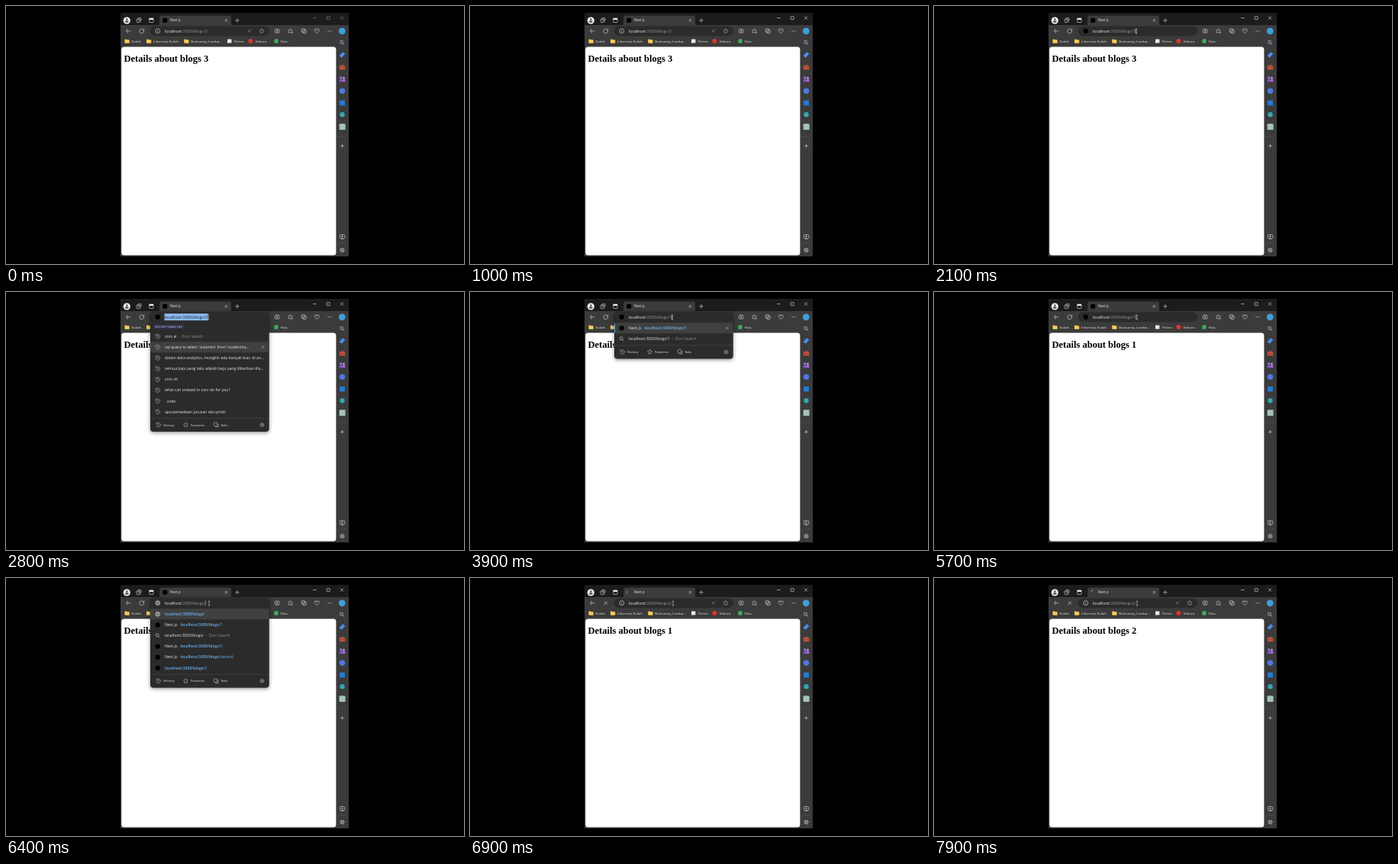
These frames come from a looping animation (600 px wide and 338 px high, 8000 ms). An HTML page with a canvas:

```html
<!DOCTYPE html>
<html lang="en">
<head>
<meta charset="utf-8">
<title>Blog details</title>
<style>
html, body { margin: 0; width: 100%; height: 100%; overflow: hidden; background: #000; }
canvas { display: block; width: 600px; height: 338px; }
</style>
</head>
<body>
<canvas id="stage"></canvas>
<script>
const LOOP = 8000;
const canvas = document.getElementById('stage');
const ctx = canvas.getContext('2d');
const dpr = window.devicePixelRatio || 1;
canvas.width = 600 * dpr;
canvas.height = 338 * dpr;

const UI = '"Open Sans", "Noto Sans", sans-serif';
const BAR = '#3b3b3b', FIELD = '#2b2b2b', ICON = '#c8c8c8', LINK = '#6cb2f2';
const BASE = 'localhost:3000/blogs/';

// Drawing helpers
function box(x, y, w, h, color, r = 0) {
  ctx.fillStyle = color;
  ctx.beginPath();
  ctx.roundRect(x, y, w, h, r);
  ctx.fill();
}
function frame(x, y, w, h, color = ICON, r = 1, lw = 0.7) {
  ctx.strokeStyle = color;
  ctx.lineWidth = lw;
  ctx.beginPath();
  ctx.roundRect(x, y, w, h, r);
  ctx.stroke();
}
function dot(x, y, r, color) {
  ctx.fillStyle = color;
  ctx.beginPath();
  ctx.arc(x, y, r, 0, Math.PI * 2);
  ctx.fill();
}
function arc(x, y, r, color = ICON, from = 0, to = Math.PI * 2, lw = 0.7) {
  ctx.strokeStyle = color;
  ctx.lineWidth = lw;
  ctx.beginPath();
  ctx.arc(x, y, r, from, to);
  ctx.stroke();
}
function line(points, color = ICON, lw = 0.7) {
  ctx.strokeStyle = color;
  ctx.lineWidth = lw;
  ctx.beginPath();
  for (let i = 0; i < points.length; i += 2) ctx.lineTo(points[i], points[i + 1]);
  ctx.stroke();
}
// Writes text centred on y and returns the x where it ends.
function label(text, x, y, size, color = '#e6e6e6', weight = 400) {
  ctx.font = `${weight} ${size}px ${UI}`;
  ctx.fillStyle = color;
  ctx.fillText(text, x, y + size * 0.35);
  return x + ctx.measureText(text).width;
}

// Icons
function cross(x, y, r, color = ICON) {
  line([x - r, y - r, x + r, y + r], color);
  line([x - r, y + r, x + r, y - r], color);
}
function plus(x, y, r) {
  line([x - r, y, x + r, y]);
  line([x, y - r, x, y + r]);
}
function star(x, y, r, color = ICON) {
  ctx.strokeStyle = color;
  ctx.lineWidth = 0.6;
  ctx.beginPath();
  for (let i = 0; i < 10; i++) {
    const a = -Math.PI / 2 + i * Math.PI / 5, d = i % 2 ? r * 0.5 : r;
    ctx.lineTo(x + d * Math.cos(a), y + d * Math.sin(a));
  }
  ctx.closePath();
  ctx.stroke();
}
function gear(x, y, r, color = ICON) {
  arc(x, y, r * 0.85, color);
  arc(x, y, r * 0.35, color);
  for (let i = 0; i < 6; i++) {
    const c = Math.cos(i * Math.PI / 3), s = Math.sin(i * Math.PI / 3);
    line([x + c * r * 0.8, y + s * r * 0.8, x + c * r * 1.15, y + s * r * 1.15], color);
  }
}
function search(x, y, color = ICON, lw = 0.7) {
  arc(x - 0.7, y - 0.7, 2, color, 0, 7, lw);
  line([x + 0.8, y + 0.8, x + 2.8, y + 2.8], color, lw);
}
function clock(x, y) {
  arc(x, y, 2.8, '#a8a8a8', -2.6, 3);
  line([x - 2.9, y - 2.8, x - 2.7, y - 1, x - 1, y - 1], '#a8a8a8', 0.6);
  line([x, y - 1.6, x, y + 0.2, x + 1.3, y + 0.2], '#a8a8a8', 0.6);
}
function globe(x, y) {
  arc(x, y, 2.9, ICON);
  ctx.beginPath();
  ctx.ellipse(x, y, 1.3, 2.9, 0, 0, 7);
  ctx.stroke();
  line([x - 2.8, y - 1, x + 2.8, y - 1], ICON, 0.5);
  line([x - 2.8, y + 1, x + 2.8, y + 1], ICON, 0.5);
}
function info(x, y) {
  arc(x, y, 3, ICON);
  line([x, y - 0.4, x, y + 1.7], ICON, 0.8);
  dot(x, y - 1.5, 0.45, ICON);
}
function site(x, y) { dot(x, y, 3.2, '#000'); }
function folder(x, y) {
  box(x - 3, y - 2.5, 3, 2, '#e2a52e', 0.5);
  box(x - 3, y - 1.8, 6.2, 4.5, '#f8cc57', 0.6);
}
const rowIcons = { clock, globe, search, site };

// Suggestion rows: icon name followed by [text, style] pieces
const STYLES = {
  plain: ['#e6e6e6', 400], dim: ['#8f8f8f', 400], link: [LINK, 400], bold: [LINK, 600]
};
const recent = [
  'zorv ai', "sql query to select 'sulambo' from 'studentna...",
  'dalam data analytics, mungkin ada banyak bias. di an...',
  'semua baju yang laku adalah baju yang diberikan dis...',
  'zorv ch', 'what can ordavel in zorv do for you?', '. code',
  'apa perbedaan jurusan dan prodi'
].map(text => ['clock', [text, 'plain']]);
recent[0].push(['  -  Zorv Search', 'dim']);

const titled = (...rest) => ['site', ['Next.js', 'plain'], [' - ', 'dim'], ...rest];
const searchRow = text => ['search', [text, 'plain'], ['  -  Zorv Search', 'dim']];
const prefixRows = [
  ['globe', [BASE, 'bold']],
  titled([BASE, 'bold'], ['1', 'link']),
  searchRow(BASE),
  titled([BASE, 'bold'], ['3', 'link']),
  titled([BASE, 'bold'], ['second', 'link']),
  ['site', [BASE, 'bold'], ['2', 'link']]
];
const exactRows = id => [
  id === '1' ? titled([BASE + id, 'bold']) : ['site', [BASE + id, 'bold']],
  searchRow(BASE + id)
];

// Each step overrides the state from its time onward.
const steps = [
  [0, { id: '3', page: '3', active: false, focus: false, list: '', selected: false, loading: false, hover: -1 }],
  [500, { active: true }],
  [2000, { focus: true }],
  [2300, { list: 'recent', selected: true, hover: 1 }],
  [3300, { selected: false }],
  [3700, { id: '', list: 'prefix', hover: 0 }],
  [3900, { id: '1', list: 'exact' }],
  [4200, { focus: false, list: '', loading: true }],
  [4600, { page: '1' }],
  [5500, { loading: false }],
  [5700, { focus: true }],
  [5800, { list: 'recent', selected: true, hover: -1 }],
  [6300, { id: '', list: 'prefix', selected: false, hover: 0 }],
  [6600, { id: '2', list: 'exact' }],
  [6900, { focus: false, list: '', loading: true }],
  [7300, { page: '2' }]
];
const stateAt = t => Object.assign({}, ...steps.filter(s => s[0] <= t).map(s => s[1]));

function drawTitleBar(s, t) {
  box(150, 9, 299, 319, '#1c1c1c', 1);
  dot(158.3, 19, 4.6, '#f4f4f4');
  dot(158.3, 17.6, 1.3, '#555');
  box(156, 19.3, 4.6, 2.4, '#555', 1.2);
  frame(171, 17, 5, 4.5);
  frame(173, 15.5, 4, 3.5);
  frame(187.7, 16, 5.4, 5.5);
  box(187.7, 16, 5.4, 2, '#f0f0f0');
  box(201, 12.5, 94, 14, BAR, [3, 3, 0, 0]);
  if (s.loading) {
    const a = Math.PI + ((t - 5200) / 900) * Math.PI * 2;
    arc(208.3, 18.8, 2.9, '#4aa3e8', a, a + 1.6, 1);
  } else site(208.3, 18.8);
  label('Next.js', 215, 18.9, 4.4);
  cross(288.5, 18.8, 1.7);
  plus(303, 18.8, 2.6);
  const control = s.active ? '#d0d0d0' : '#777';
  line([402, 15.7, 406.5, 15.7], control);
  frame(420.2, 13.7, 4, 4, control, 0.5);
  cross(440, 15.6, 2, control);
}

function drawToolbar(s) {
  box(150, 25, 299, 303, BAR);
  line([163.4, 32.8, 157.2, 32.8]);
  line([160, 30, 157.2, 32.8, 160, 35.6]);
  if (s.loading) cross(177.8, 32.8, 2.2);
  else {
    arc(177.8, 32.8, 2.9, ICON, -0.3, 5.2);
    line([180.6, 29.5, 180.6, 31.7, 178.5, 31.7]);
  }
  box(188.5, 26.5, 156.5, 12.7, FIELD, 6.3);

  frame(352.5, 30.2, 2.7, 5.2);
  frame(355.2, 30.2, 2.7, 5.2);
  star(372.3, 32.8, 3.2);
  line([374, 35, 376, 35]);
  frame(387.3, 29.7, 4.3, 4.5);
  frame(389, 31.2, 4.3, 4.5);
  arc(405.7, 31.7, 1.6, ICON, 2.6, 6.2);
  arc(408.7, 31.7, 1.6, ICON, 3.2, 6.8);
  line([404.3, 32.6, 407.2, 35.6, 410.1, 32.6]);
  for (let i = -1; i < 2; i++) dot(424 + i * 2, 32.8, 0.6, ICON);
  dot(440.3, 32.8, 4.4, '#3d9fda');
}

function drawBookmarks() {
  const marks = [[158.5, 'Kuliah'], [187, 'Informasi Kuliah'], [236.3, 'Bootcamp, Lomba...']];
  for (const [x, name] of marks) {
    folder(x, 46);
    label(name, x + 6, 46, 4.35);
  }
  box(290, 43.5, 5.4, 5, '#e8e8e8', 0.5);
  label('Pelmo', 299, 46, 4.35);
  dot(320.3, 46, 3, '#e3322b');
  label('Vidorra', 326.5, 46, 4.35);
  dot(354, 46, 2.9, '#43a85a');
  label('Rutu', 360, 46, 4.35);
}

function drawSidebar() {
  search(440.3, 48, '#9db7d8', 0.9);
  ctx.save();
  ctx.translate(440.5, 64);
  ctx.rotate(-Math.PI / 4);
  box(-3.5, -2.1, 7, 4.2, '#4a8fe8', 1);
  ctx.restore();
  frame(438.8, 77, 3.4, 3, '#b95a40');
  box(436.8, 78.3, 7.5, 5, '#c7563c', 0.8);
  line([436.8, 80.8, 444.3, 80.8], '#7e3024', 0.6);
  dot(438.8, 93.9, 1.6, '#9a78e0');
  box(436.8, 95.7, 4.3, 3.7, '#7d55c8', 1);
  dot(442.5, 94.2, 1.5, '#c393e6');
  box(441, 95.9, 3.4, 3.3, '#b26bd2', 1);
  dot(440.5, 111.3, 3.7, '#5179dc');
  box(437, 123.8, 7, 6.8, '#2479cf', 1);
  dot(440.5, 142.3, 3.2, '#35a6b5');
  box(436.6, 154.3, 8, 8, '#a3c4b8', 1.2);
  line([436, 171, 446, 171], '#606060', 0.5);
  plus(440.5, 183.3, 2.4);
  frame(437.4, 299.5, 6.3, 4.8);
  plus(440.5, 301.8, 1.3);
  line([438.8, 305.2, 442.2, 305.2]);
  line([436, 311, 446, 311], '#606060', 0.5);
  gear(440.5, 319.8, 2.8);
}

function drawPage(s) {
  box(151.2, 53.4, 281.2, 273.2, '#fff', 3.5);
  ctx.font = 'bold 12.5px "Liberation Serif", "Times New Roman", serif';
  ctx.fillStyle = '#000';
  ctx.fillText('Details about blogs ' + s.page, 154.5, 73.3);
}

function drawSuggestions(s) {
  const rows = s.list === 'recent' ? recent : s.list === 'prefix' ? prefixRows : exactRows(s.id);
  const first = s.list === 'recent' ? 58.2 : 47.3;
  const rowY = i => first + i * 14.1;
  const rule = rowY(rows.length - 1) + 8.5;
  const foot = rule + 8.6;

  ctx.save();
  ctx.shadowColor = 'rgba(0,0,0,.45)';
  ctx.shadowBlur = 5 * dpr;
  ctx.shadowOffsetY = 1.5 * dpr;
  box(189, 25.7, 155.7, rule + 17.5 - 25.7, FIELD, 4);
  ctx.restore();

  if (s.list === 'recent') {
    box(193.5, 42, 40.5, 7.3, '#2d2f42');
    label('RECENT SEARCHES', 195, 45.7, 4.15, '#c3c8ef');
  }
  rows.forEach(([icon, ...pieces], i) => {
    const y = rowY(i);
    if (i === s.hover) {
      box(189, y - 7, 155.7, 14, '#404040');
      if (s.list === 'exact') box(189, y - 6, 1, 12, '#5aa9ee');
      if (s.list !== 'prefix') cross(336.8, y, 1.8, '#a0a0a0');
    }
    rowIcons[icon](198.7, y);
    let x = 208;
    for (const [text, style] of pieces) x = label(text, x, y, 5.1, ...STYLES[style]);
  });

  line([189, rule, 344.7, rule], '#4a4a4a', 0.6);
  clock(199.6, foot);
  label('History', 206, foot, 4.35);
  star(235.4, foot, 3.2, '#b5b5b5');
  label('Favorites', 242, foot, 4.35);
  frame(272.3, foot - 3, 4.4, 4.4, '#b5b5b5');
  line([274, foot + 2.7, 278, foot + 2.7, 278, foot - 1.5], '#b5b5b5');
  label('Tabs', 281, foot, 4.35);
  gear(335.5, foot, 2.5, '#a0a0a0');
}

function drawAddress(s, t) {
  const y = 32.7;
  if (!s.focus) {
    info(198.8, y);
    label('A', 316.5, y + 0.3, 5, '#909090');
    line([320.3, 30.4, 321.3, 31.5, 320.3, 32.6], '#909090', 0.5);
    star(335, y, 3.2, '#a8a8a8');
  } else if (s.list === 'prefix') globe(198.8, y);
  else site(198.8, y);

  const size = 5.3, url = BASE + s.id;
  ctx.font = `400 ${size}px ${UI}`;
  if (s.selected) box(207.5, 28.3, ctx.measureText(url).width + 1, 9, '#8cb9ee');
  const host = label('localhost', 208, y, size, s.selected ? '#15273d' : '#ececec');
  const end = label(url.slice(9), host, y, size, s.selected ? '#15273d' : '#989898');
  if (s.focus && !s.selected) line([end + 0.5, 29.5, end + 0.5, 36], '#e0e0e0', 0.5);
}

function drawPointer(t) {
  if (t < 1100) return;
  const p = Math.min(1, (t - 1100) / 650);
  const ease = p * p * (3 - 2 * p);
  const x = 325 + (265 - 325) * ease, y = 236 + (33 - 236) * ease;
  if (y < 40) {
    const bx = t > 5100 ? 266 : x;
    line([bx, y - 2.6, bx, y + 3], '#ddd', 0.6);
    line([bx - 1.1, y - 2.7, bx + 1.1, y - 2.7], '#ddd', 0.5);
    line([bx - 1.1, y + 3.1, bx + 1.1, y + 3.1], '#ddd', 0.5);
    return;
  }
  ctx.beginPath();
  for (const [dx, dy] of [[0, 0], [0, 7], [1.6, 5.5], [2.7, 8], [3.8, 7.5], [2.8, 5.1], [5, 5]]) {
    ctx.lineTo(x + dx, y + dy);
  }
  ctx.closePath();
  ctx.fillStyle = '#fff';
  ctx.strokeStyle = '#000';
  ctx.lineWidth = 0.6;
  ctx.fill();
  ctx.stroke();
}

const start = performance.now();
function draw() {
  const t = (performance.now() - start) % LOOP;
  const s = stateAt(t);
  ctx.setTransform(dpr, 0, 0, dpr, 0, 0);
  box(0, 0, 600, 338, '#000');
  drawTitleBar(s, t);
  drawToolbar(s);
  drawBookmarks();
  drawSidebar();
  drawPage(s);
  if (s.list) drawSuggestions(s);
  drawAddress(s, t);
  drawPointer(t);
  requestAnimationFrame(draw);
}
draw();
</script>
</body>
</html>
```
